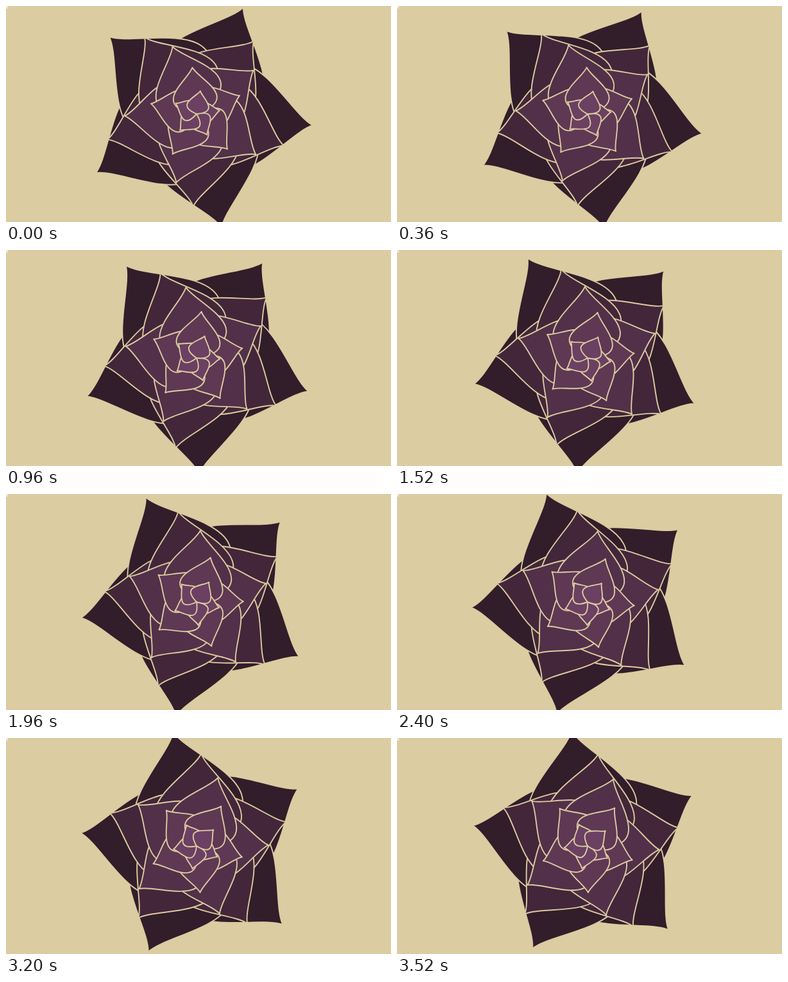
An HTML page with a canvas that plays this animation: 600x338 px, repeating every 3.56 s.

```html
<!DOCTYPE html>
<html lang="en">
<head>
<meta charset="utf-8">
<title>Turning rosette</title>
<style>
  html, body { margin: 0; width: 100%; height: 100%; overflow: hidden; background: #dbcca1; }
  canvas { display: block; width: 600px; height: 338px; }
</style>
</head>
<body>
<canvas id="stage" width="600" height="338"></canvas>
<script>
const ctx = document.getElementById('stage').getContext('2d');
const LOOP = 3560, STEP = 40;
const DEG_PER_MS = 0.01152;
const CENTER = { x: 297, y: 169 };
const PAPER = '#dbcca1';
const PETALS = 5;
const LAYERS = [
  { radius: 182, fill: '#321d2a' },
  { radius: 144.7, fill: '#44263a' },
  { radius: 112, fill: '#523049' },
  { radius: 73, fill: '#5f3854' },
  { radius: 36.5, fill: '#6b4062' }
];

// Spade shape on the x axis: rounded base at the origin, tip at (r, 0)
function petalPath(r) {
  const path = new Path2D();
  path.moveTo(0, 0);
  path.bezierCurveTo(0.25 * r, r, 0.75 * r, 0.1 * r, r, 0);
  path.bezierCurveTo(0.75 * r, -0.1 * r, 0.25 * r, -r, 0, 0);
  path.closePath();
  return path;
}

for (const layer of LAYERS) layer.path = petalPath(layer.radius);

function draw(time) {
  ctx.fillStyle = PAPER;
  ctx.fillRect(0, 0, 600, 338);
  ctx.fillStyle = '#eee6dc';
  ctx.fillRect(0, 0, 3, 4);

  ctx.strokeStyle = PAPER;
  ctx.lineWidth = 1.9;
  ctx.lineJoin = 'round';
  LAYERS.forEach(({ path, fill }, i) => {
    ctx.fillStyle = fill;
    for (let k = 0; k < PETALS; k++) {
      const degrees = 293.6 + 14.4 * i + 72 * k + time * DEG_PER_MS;
      ctx.save();
      ctx.translate(CENTER.x, CENTER.y);
      ctx.rotate(degrees * Math.PI / 180);
      ctx.fill(path);
      ctx.stroke(path);
      ctx.restore();
    }
  });
}

const start = performance.now();
function tick() {
  const time = (performance.now() - start) % LOOP;
  draw(Math.floor(time / STEP) * STEP);
  requestAnimationFrame(tick);
}
tick();
</script>
</body>
</html>
```
